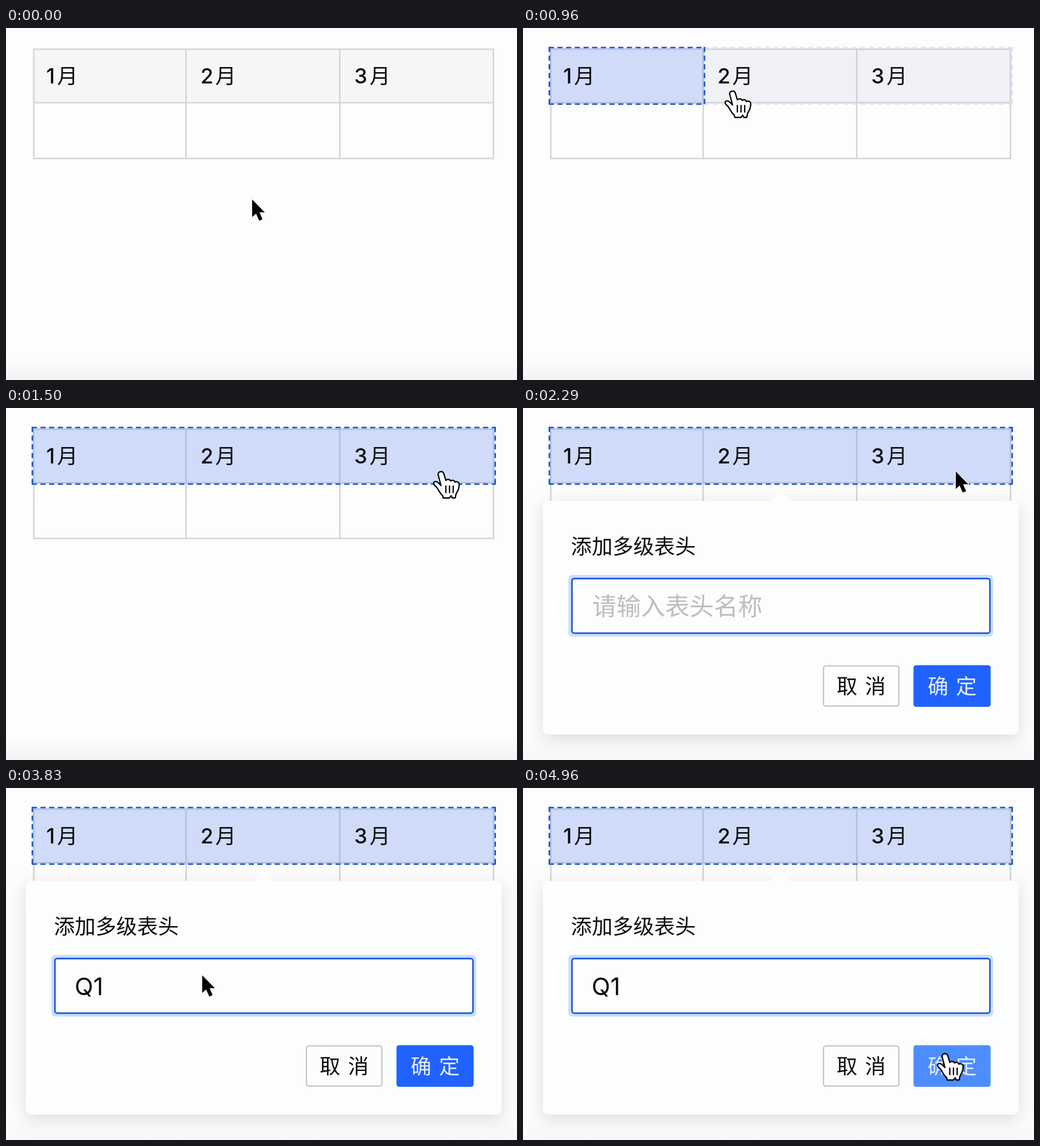
An HTML page with a canvas that plays this animation: 901x622 px, repeating every 5000 ms.

```html
<!DOCTYPE html>
<html lang="zh">
<head>
<meta charset="utf-8">
<style>
html, body { margin: 0; width: 100%; height: 100%; overflow: hidden; background: #fdfdfd; }
canvas { display: block; }
</style>
</head>
<body>
<canvas id="stage" width="901" height="622"></canvas>
<script>
const ctx = document.getElementById('stage').getContext('2d');
const W = 901, H = 622, LOOP = 5000;
const FONT = 'Inter, "Noto Sans CJK SC", "Noto Sans CJK", sans-serif';
const CJK = '"Noto Sans CJK SC", "Noto Sans CJK JP", "Noto Sans CJK", sans-serif';
const COLS = [49, 317.5, 588.5, 859.5];
const ROWS = [37.5, 132, 230.5];
const CLICKS = [650, 1050, 1450];
const POPUP = 1750;

// Pointer path: time, x, y
const PATH = [
  [0, 434, 303], [150, 434, 303], [560, 215, 112], [720, 220, 112],
  [970, 366, 111], [1090, 372, 111], [1400, 763, 112], [2380, 763, 112],
  [2950, 356, 327], [3100, 356, 327], [3350, 346, 331], [4100, 346, 331],
  [4650, 740, 469], [5000, 740, 469]
];

const clamp = v => Math.max(0, Math.min(1, v));
const ease = v => v * v * (3 - 2 * v);

function pointerAt(t) {
  let i = 1;
  while (i < PATH.length - 1 && PATH[i][0] < t) i++;
  const [t0, x0, y0] = PATH[i - 1], [t1, x1, y1] = PATH[i];
  const k = ease(clamp((t - t0) / (t1 - t0)));
  return { x: x0 + (x1 - x0) * k, y: y0 + (y1 - y0) * k };
}

function text(str, x, y, size, color = '#0c0c0c', weight = 400, family = CJK) {
  ctx.font = `${weight} ${size}px ${family}`;
  ctx.fillStyle = color;
  ctx.fillText(str, x, y);
}

function box(x, y, w, h, r, fill, stroke, line = 2.5) {
  ctx.beginPath();
  ctx.roundRect(x, y, w, h, r);
  if (fill) { ctx.fillStyle = fill; ctx.fill(); }
  if (stroke) { ctx.strokeStyle = stroke; ctx.lineWidth = line; ctx.stroke(); }
}

function line(x0, y0, x1, y1) {
  ctx.beginPath();
  ctx.moveTo(x0, y0);
  ctx.lineTo(x1, y1);
  ctx.stroke();
}

function dashedBox(x0, x1, color, tint) {
  const y0 = 34.5, y1 = 134.5;
  ctx.fillStyle = tint;
  ctx.fillRect(x0, y0, x1 - x0, y1 - y0);
  ctx.strokeStyle = color;
  ctx.lineWidth = 2.7;
  ctx.setLineDash([9, 6.3]);
  line(x0 - 1, y0, x1 + 1, y0);
  line(x0 - 1, y1, x1 + 1, y1);
  line(x0, y0 - 1, x0, y1 + 1);
  line(x1, y0 - 1, x1, y1 + 1);
  ctx.setLineDash([]);
}

function drawTable(selected, hover) {
  ctx.fillStyle = '#f6f6f6';
  ctx.fillRect(COLS[0], ROWS[0], COLS[3] - COLS[0], ROWS[1] - ROWS[0]);
  ctx.strokeStyle = '#d5d5d5';
  ctx.lineWidth = 2.7;
  for (const x of COLS) line(x, ROWS[0] - 1.3, x, ROWS[2] + 1.3);
  for (const y of ROWS) line(COLS[0], y, COLS[3], y);

  const edges = [46.5, 320, 591, 862.5];
  if (hover && selected < 3)
    dashedBox(edges[selected], edges[3], '#e2e4f2', 'rgba(80,100,255,.03)');
  if (selected)
    dashedBox(edges[0], edges[selected], '#1652cc', 'rgba(31,98,255,.18)');

  [[71, 90], [343, 369], [614, 641]].forEach(([digitX, monthX], i) => {
    text(String(i + 1), digitX, 98, 36.7, '#0c0c0c', 500, FONT);
    text('月', monthX, 98, 36.7, '#0c0c0c', 500);
  });
}

function drawPopup(alpha, typed, hot) {
  ctx.save();
  ctx.globalAlpha = alpha;
  ctx.save();
  ctx.shadowColor = 'rgba(0,0,0,.13)';
  ctx.shadowBlur = 30;
  ctx.shadowOffsetY = 8;
  box(35, 164, 839, 413, 9, '#fcfdfd');
  ctx.restore();
  ctx.beginPath();
  ctx.moveTo(436, 165);
  ctx.lineTo(452, 149);
  ctx.quadraticCurveTo(455, 146, 458, 149);
  ctx.lineTo(474, 165);
  ctx.fillStyle = '#fcfdfd';
  ctx.fill();

  text('添加多级表头', 84.5, 258, 36.7, '#0c0c0c', 500);

  box(80, 295, 749, 109, 7, '#cbddfc');
  box(86.3, 301.3, 737, 96.5, 4, '#fcfdfd', '#1a57d8', 2.7);
  if (typed) text(typed, 121, 366, 43, '#0c0c0c', 400, FONT);
  else text('请输入表头名称', 122, 366, 42.9, '#bdbdbd');

  box(529.8, 455.8, 133, 71, 4, '#fdfdfd', '#c9c9c9');
  text('取', 553, 505, 36.5);
  text('消', 603, 505, 36.5);
  box(688.5, 454.5, 136, 73.5, 4.5, hot ? '#4d8dfd' : '#1f62fe');
  const label = hot ? '#e4eeff' : '#eaf1ff';
  text('确', 713.5, 505, 36.5, label);
  text('定', 763.5, 505, 36.5, label);
  ctx.restore();
}

const ARROW = new Path2D('M0 0V31L6.8 25L12.5 37.5L18.3 35L13 22.8H22.3Z');
const HAND = new Path2D(
  'M-5 6C-6 0 3 -2 5 4L8.5 16C11 13 16 14 17 17C20 14.500 24 16 24.500 19' +
  'C28 17 32 19 32 23C32.500 31 29 35 27 39C25.500 42 26 44 25 47' +
  'H20L18 43L15 47H4L3 43C-1 40 -4 34 -7 29C-9 26 -13 24 -13 21' +
  'C-13 17 -8 17 -5 20L0 25Z');

function drawPointer(x, y, hand) {
  ctx.save();
  ctx.lineJoin = 'round';
  ctx.lineCap = 'round';
  if (hand) {
    ctx.translate(x + 4, y);
    ctx.fillStyle = '#fff';
    ctx.strokeStyle = '#000';
    ctx.lineWidth = 2.3;
    ctx.fill(HAND);
    ctx.stroke(HAND);
    for (const lx of [8.5, 15, 21.5]) line(lx, 26, lx, 37.5);
  } else {
    ctx.translate(x, y);
    ctx.strokeStyle = '#fff';
    ctx.lineWidth = 2.5;
    ctx.stroke(ARROW);
    ctx.fillStyle = '#000';
    ctx.fill(ARROW);
  }
  ctx.restore();
}

function draw(t) {
  const p = pointerAt(t);
  const open = t >= POPUP;
  const hover = !open && p.y < 135 && p.x > 46 && p.x < 863;
  const hot = open && p.x > 688 && p.x < 825 && p.y > 454 && p.y < 528;
  const selected = CLICKS.filter(c => t >= c).length;
  const typed = t >= 3650 ? 'Q1' : t >= 3450 ? 'Q' : '';

  ctx.fillStyle = '#fdfdfd';
  ctx.fillRect(0, 0, W, H);
  const fade = ctx.createLinearGradient(0, 580, 0, H);
  fade.addColorStop(0, '#fdfdfd');
  fade.addColorStop(1, open ? '#f8f8f8' : '#f3f3f3');
  ctx.fillStyle = fade;
  ctx.fillRect(0, 580, W, H - 580);

  drawTable(selected, hover);
  if (open) drawPopup(clamp((t - POPUP) / 160), typed, hot);
  drawPointer(p.x, p.y, hover || hot);
}

const start = performance.now();
function tick(now) {
  draw(Math.max(0, now - start) % LOOP);
  requestAnimationFrame(tick);
}
draw(0);
requestAnimationFrame(tick);
</script>
</body>
</html>
```
